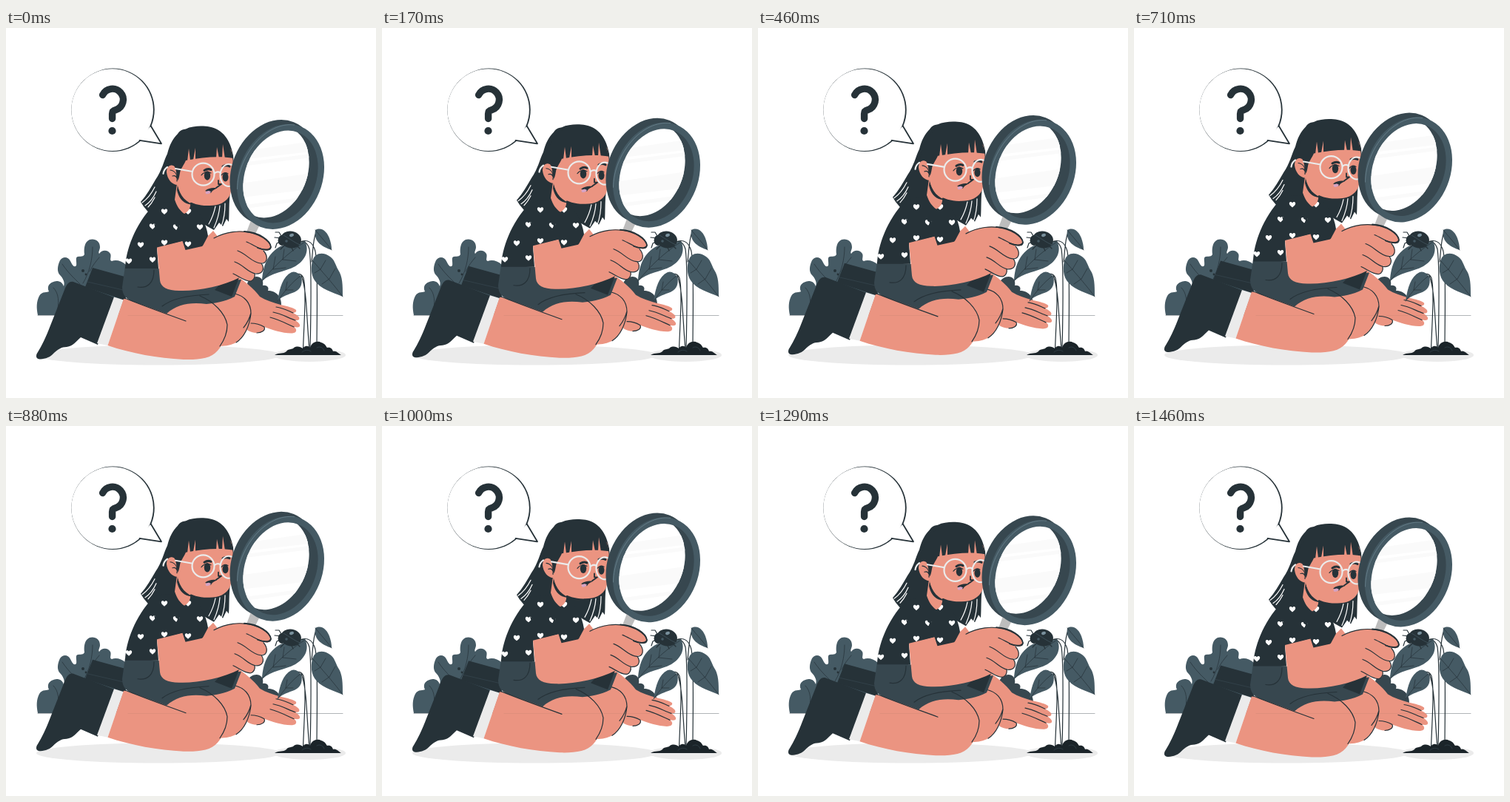
Animation of 500 by 500 pixels, one loop 1500 ms. Source, as an HTML page:

```html
<!DOCTYPE html>
<html lang="en">
<head>
<meta charset="utf-8">
<title>Looking closely</title>
<style>
html, body { margin: 0; width: 100%; height: 100%; overflow: hidden; background: #fff; }
svg { display: block; width: 100%; height: 100%; }
.dark { fill: #263238; }
.slate { fill: #37474f; }
.leaf { fill: #455a64; }
.skin { fill: #eb9481; }
.pale { fill: #ebebeb; }
.white { fill: #fff; }
.line { fill: none; stroke: #263238; stroke-width: 1.2; stroke-linecap: round; stroke-linejoin: round; }
.thin { stroke-width: .7; }
.bold { stroke-width: 1.8; }
.light { fill: none; stroke: #fff; stroke-width: 1.2; stroke-linecap: round; }
.wire { fill: none; stroke: #ebebeb; stroke-width: 2.2; stroke-linecap: round; }
</style>
</head>
<body>
<svg viewBox="0 0 500 500">
<defs>
  <path id="heart" d="M0 4C-3 1.6-4.4.2-4.2-1.7C-3.9-4-1-4.2 0-2C1-4.2 3.9-4 4.2-1.7C4.4.2 3 1.6 0 4Z" class="white"/>
  <clipPath id="hole"><ellipse cx="371" cy="201" rx="48" ry="64.5" transform="rotate(22 371 201)"/></clipPath>
  <clipPath id="pane"><ellipse cx="359" cy="194" rx="48" ry="64.5" transform="rotate(22 359 194)"/></clipPath>
</defs>

<!-- ground -->
<ellipse cx="206" cy="442" rx="165" ry="13.5" class="pale"/>
<ellipse cx="410" cy="442" rx="49" ry="9" class="pale"/>
<path d="M43 388.5H455" class="line" stroke-opacity=".6" style="stroke-width:.6"/>

<!-- bushes -->
<path d="M43 388C41 378 41 370 45 362C49 355 56 358 58 356C54 347 62 342 70 342C75 343 77 346 78 349C80 344 77 338 73 334C68 329 70 320 73 314C77 308 84 309 87 315C90 321 92 324 95 321C96 316 93 310 97 309C101 308 104 310 106 306C105 298 106 289 113 286C120 284 127 288 127 296C127 300 124 303 126 305C130 299 138 300 141 305C143 309 139 314 143 315C148 313 156 314 162 320V388Z" class="leaf"/>
<path d="M117 296C117 312 113 330 104 345M126 310C121 316 117 321 113 329M76 319C84 331 92 338 100 346M64 351C71 358 73 370 68 388" class="line thin"/>
<circle cx="104" cy="328" r="2" class="dark"/><circle cx="108" cy="333" r="1.4" class="dark"/>
<path d="M326 345C331 332 350 333 347 348C352 347 356 350 354 355C364 355 373 362 372 376L336 378Z" class="slate"/>

<!-- speech bubble -->
<circle cx="144.5" cy="110.8" r="56.2" class="dark"/>
<circle cx="143.6" cy="110.6" r="55.3" class="white"/>
<path d="M195 133L210 156.3L180 151.5" class="white"/>
<path d="M195.8 132.5L210 156.3L180.5 151.8" class="line bold"/>
<path d="M130.6 90.5A14.6 14.6 0 1 1 148.5 110.6C145 111.5 143.6 112.5 143.6 116V122.5" class="line" style="stroke-width:9.4"/>
<circle cx="143.5" cy="139" r="5.1" class="dark"/>

<g id="figure">
  <!-- boots -->
  <path d="M117 324L164 337L161 368L107 350Z" class="dark"/>
  <path d="M110 343L158 354" class="line thin" style="stroke:#37474f"/>
  <path d="M91 343L146 364L124 428L101 418C95 423 91 430 82 431C75 431 70 434 63 441C58 446 50 447.5 45 447.5C40 447 40 442 43 438C48 430 54 418 60 402L79 354C82 346 85 342 91 343Z" class="dark"/>
  <path d="M146 363.5L159 367.5L137.5 429L123 426Z" class="pale"/>

  <!-- far arm and hand -->
  <path d="M312 335C322 342 335 352 343 363C351 368 361 371 371 374C380 376 389 378 392 381C393 384 390 385 387 385C393 387 398 391 396 394C395 395 393 395 391 395C396 398 399 402 396 404C394 405 391 404 389 404C394 407 393 412 387 412.5C374 413 361 408 349 404C351 409 346 412 339 412C329 412 323 407 321 400L303 360Z" class="skin"/>
  <path d="M365 377C374 378 381 382 388 385M361 384C372 386 382 392 391 395M357 391C369 394 380 400 389 404M349 404C344 401 337 399 331 399M349 404C351 409 345 412 339 412" class="line"/>

  <!-- legs -->
  <path d="M262 366L308 357C321 360 330 369 331 384C330 402 322 419 309 426C302 429 295 430 286 430Z" class="skin"/>
  <path d="M309 359C322 362 331 371 331 386C329 403 322 418 311 425M331 385C329 393 325 400 321 405" class="line"/>
  <path d="M159 366L225 372L271 371C288 376 299 389 299 405C298 418 292 429 286 436C277 447 260 448.5 240 448C205 446 170 440 137.5 429Z" class="skin"/>

  <!-- shorts -->
  <path d="M161 322L206 325L255 345L318 340L309 363C295 370 282 372 271 373C250 370 231 373 217 386L176 371C162 367 157 361 157 350Z" class="slate"/>
  <path d="M158 364C187 376 216 386 243 396M262 362C281 370 296 385 299 401C299 413 294 423 289 430M211 376C225 365 249 361 274 360M178 350C191 352 200 345 200 327" class="line"/>
  <path d="M282 354L293 342L315 337L305 363Z" class="dark"/>

  <!-- hair behind -->
  <path d="M232 143C236 137 240 137 243 136.5C252 132 266 132 275 133.5C293 137 303 151 307 172C309 190 306 207 303 222C301 236 302 250 301 262L298 258L293 268L288 263L281 273L272 268L240 247L194 250.5C188 244 185 240 182 235C190 226 196 215 202 205C211 192 213 180 218 170C221 158 225 150 232 143Z" class="dark"/>

  <!-- shirt -->
  <path d="M262 290C269 285 275 279 280 274L287 283L265 298Z" class="skin"/>
  <path d="M199 240C213 233 232 235 249 239C262 248 270 262 273 281L265 296L242 301L238 288.5L204 297.5L206 325L161 325C162 300 174 266 199 240Z" class="dark"/>
  <g id="hearts"></g>
  <path d="M200 264L205 268L200 270L203 275Z M231 262L229 267L232 269L230 275L234 277L234 262Z" class="dark"/>

  <!-- neck, face, ear -->
  <path d="M231 210L228 232C231 241 235 247 241 251C247 248 250 242 249 236L259 232Z" class="skin"/>
  <path d="M232 212C235 227 243 236 257 240L247 238C238 236 233 228 231 219Z" class="dark"/>
  <path d="M234 172L304 164C309 184 308 207 303 225C298 236 287 240 275 240C250 241 235 229 232 212C224 212 218 204 217 195C217 187 222 183 228 187C232 190 233 193 233 197Z" class="skin"/>
  <path d="M222 192C229 193 232 199 231 207M225 200C228 199 230 200 231 203" class="line"/>

  <!-- fringe -->
  <path d="M222 172C230 150 243 135 263 134C285 135 301 147 307 176C290 173 268 174 243 179C240 186 236 190 235 196C234 202 233 205 232 206C230 200 231 192 227 186C222 183 218 184 217 188Z" class="dark"/>
  <path d="M245 180L247 163L249 179ZM253 178L256 162L256 178ZM284 176L285 161L288 176ZM292 176L293 157L296 177Z" class="skin"/>

  <!-- features -->
  <ellipse cx="272" cy="199.5" rx="4.2" ry="6.2" class="dark"/>
  <ellipse cx="296.5" cy="201.5" rx="4" ry="6" class="dark"/>
  <path d="M264 199C268 194 272 193.5 277 196M291 199C294 195 297 195 300 197" class="line"/>
  <path d="M268 192.5C271 190.5 274 190 277 191.5M293 187C296 185.5 299 185.5 302 187" class="line" style="stroke-width:3"/>
  <path d="M287 206L287 211L291 211L284 216" class="line bold"/>
  <path d="M269 220C274 216 280 215.5 285 216.5C281 219 279 219 277 223Z" class="dark"/>
  <path d="M269.5 221.5C272 219.5 275 219.5 277 221.5C275 224 272 225 270 224Z" fill="#d6a3c4"/>
  <path d="M229 190L252 194M282 196C285 194 288 194 290 196M218 188C215 190 213 193 212.5 197" class="wire"/>
  <circle cx="266.5" cy="197.7" r="15" class="wire"/>
  <ellipse cx="301" cy="199" rx="11.5" ry="15" class="wire"/>

  <!-- hair strands -->
  <path d="M201 215C196 225 191 231 184 236M203 221C199 230 194 236 188 240M201 229C198 235 196 238 192 242M283 241C281 251 278 258 274 265M289 240C288 253 285 261 281 270M296 237C296 251 294 260 291 268" class="light"/>

  <!-- magnifier -->
  <path d="M331 260L344 264L333 286L323 281Z" fill="#bdbdbd"/>
  <ellipse cx="361.5" cy="195" rx="56.4" ry="73" transform="rotate(22 361.5 195)" class="slate"/>
  <ellipse cx="371" cy="201" rx="56.4" ry="73" transform="rotate(22 371 201)" class="leaf"/>
  <path d="M390 131C352 126 313 172 312.5 218" fill="none" stroke="#78909c" stroke-width=".6"/>
  <g clip-path="url(#hole)">
    <path d="M300 120H440V280H300Z" class="slate"/>
    <g clip-path="url(#pane)">
      <path d="M300 120H440V280H300Z" class="white"/>
      <path d="M310 168L420 152V166L310 179ZM310 183L420 169V174L310 188ZM310 211L420 195V217L310 230ZM310 241L420 226V231L310 246Z" fill="#fafafa"/>
    </g>
  </g>

  <!-- near arm and hand -->
  <path d="M204 296.5L238.5 288L242.5 300L265 295C277 285 292 276 311 275C328 273 344 279 353 287C359 293 359 300 353 301L347 300C353 306 355 313 350 317L345 317C349 324 348 332 341 332L336 331C338 338 334 343 328 342L316 337C293 349 258 356 234 355C218 355 209 350 208 341Z" class="skin"/>
  <path d="M281 284C297 275 316 273 332 277C347 281 358 290 358 297C357 302 348 300 341 297C335 294 330 291 325 289M313 301C325 305 332 317 344 318C353 319 355 309 348 301M309 316C321 320 326 330 337 332C347 333 350 325 345 318M307 332C316 336 323 343 331 342C335 341 337 336 336 332" class="line"/>
  <path d="M322 275C342 276 357 287 358 296C356 301 347 300 340 297" class="line bold"/>
</g>

<path d="M165 388.5H396" class="line" stroke-opacity=".1" style="stroke-width:.6"/>

<!-- plant -->
<path d="M401.5 434C403 394 406 354 402 338C399 331 393 331 388 335M410 434C406 394 407 354 399 335M411 434C412 390 413 320 410 299C408 291 403 287 397 289M420 434C420 390 422 322 418 302C415 290 408 286 400 288M413 316C415 299 415 285 419 276" class="line"/>
<g class="leaf">
  <path d="M346 342C347 321 354 304 371 295C382 290 394 291 404 288C411 302 403 315 391 322C376 330 359 330 346 342Z"/>
  <path d="M414 315C417 303 429 302 438 309C444 313 445 320 449 327C455 336 455 347 455 363C441 357 425 353 417 341C412 333 412 323 414 315Z"/>
  <path d="M418 273C427 268 434 276 437 284C439 290 440 294 440 300C429 296 415 290 418 273Z"/>
  <path d="M367 369C370 350 374 336 386 330C391 328 396 332 399 336C402 348 396 355 387 358C379 361 372 363 367 369Z"/>
</g>
<g class="line thin">
  <path d="M346 342C363 321 381 304 404 289M361 326L364 309M374 313L376 299M361 326L378 324M374 313L392 315"/>
  <path d="M414 314C426 328 440 343 455 363M425 326L432 314M437 339L445 325M425 326L417 331M437 339L427 346"/>
  <path d="M418 273C425 282 433 290 440 300"/>
  <path d="M367 369C376 356 387 343 398 335M378 354L380 343M378 354L388 354"/>
</g>
<path d="M363 442C370 438 374 441 379 437C381 433 387 435 389 432C394 429 398 431 401 433C404 429 408 429 411 432C413 424 421 422 426 425C432 427 432 430 434 432C439 431 441 434 442 437C447 436 449 440 453 442Z" fill="#1b2429"/>
<path d="M400 438C405 434 409 435 412 437M420 432C425 429 429 433 430 436" class="line thin" style="stroke:#37474f"/>

<!-- beetle -->
<path d="M374 287L366 291L364 297M376 294L371 299M386 297L388 301M372 284L363 283M372 281L369 276L364 276M393 294L397 298" class="line"/>
<ellipse cx="385" cy="286" rx="14" ry="11.5" transform="rotate(10 385 286)" class="dark"/>
<ellipse cx="373" cy="287" rx="5.5" ry="7" class="dark"/>
<ellipse cx="386" cy="280" rx="3" ry="2" transform="rotate(-20 386 280)" fill="#78909c"/>
<circle cx="379" cy="288" r="1.8" class="leaf"/>
<path d="M375 280C382 284 390 290 397 293" class="line thin" style="stroke:#455a64"/>
</svg>
<script>
const PERIOD = 1500, LIFT = 10;
const figure = document.getElementById('figure');
const hearts = [[214, 248], [246, 248], [198, 268], [230, 269], [262, 269],
  [182, 293], [214, 290], [246, 292], [166, 315], [198, 313]];

document.getElementById('hearts').innerHTML =
  hearts.map(([x, y]) => `<use href="#heart" x="${x}" y="${y}"/>`).join('');

// Steady rise, then steady fall
function draw(ms) {
  const p = (ms % PERIOD) / PERIOD;
  const lift = LIFT * (1 - Math.abs(1 - 2 * p));
  figure.setAttribute('transform', `translate(0 ${-lift})`);
}

const start = performance.now();
function tick() {
  draw(performance.now() - start);
  requestAnimationFrame(tick);
}
draw(0);
requestAnimationFrame(tick);
</script>
</body>
</html>
```
